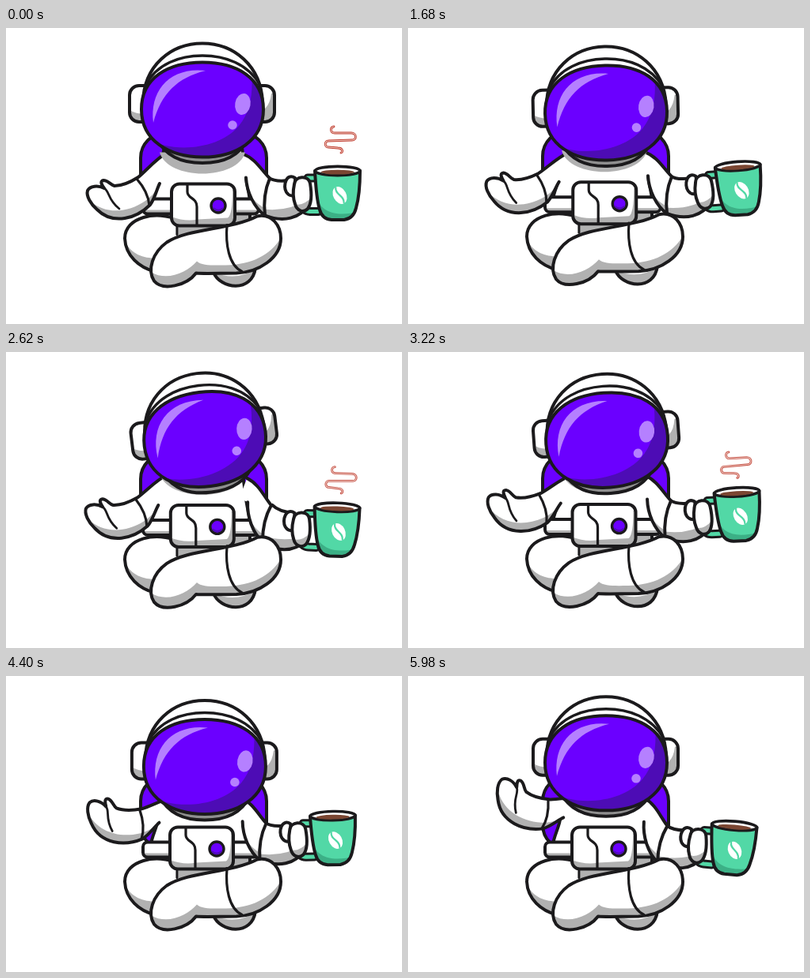
Recreate the animation shown at these times as an HTML page. Size 500 by 375 pixels, loop 6 s.

```html
<!DOCTYPE html>
<html lang="en">
<head>
<meta charset="utf-8">
<title>Meditating astronaut</title>
<style>
html, body { margin: 0; width: 100%; height: 100%; overflow: hidden; background: #fff; }
svg { display: block; width: 100vw; height: 100vh; }
</style>
</head>
<body>
<svg id="stage" viewBox="0 0 500 375" fill="none" stroke-linecap="round" stroke-linejoin="round"></svg>
<script>
const INK = '#1b1a1c', GRAY = '#b1b1b1', WHITE = '#fff', PURPLE = '#6b00ff';
const MINT = '#52d8a6', MINT_DARK = '#3cb086';
let clips = 0;

const fill = (d, color) => `<path d="${d}" fill="${color}"/>`;
const line = (d, width = 3.2, color = INK) => `<path d="${d}" stroke="${color}" stroke-width="${width}"/>`;
const group = (id, ...parts) => `<g id="${id}">${parts.join('')}</g>`;

// Filled shape with a clipped shadow and an outline on top
function part(d, color, shade, shadeColor = GRAY, outline = d) {
  const id = 'clip' + clips++;
  return `<clipPath id="${id}"><path d="${d}"/></clipPath>` + fill(d, color) +
    (shade ? `<g clip-path="url(#${id})">${fill(shade, shadeColor)}</g>` : '') + line(outline, 4);
}
const box = (x, y, w, h, r) =>
  `M${x + r} ${y}h${w - 2 * r}a${r} ${r} 0 0 1 ${r} ${r}v${h - 2 * r}a${r} ${r} 0 0 1 ${-r} ${r}` +
  `h${2 * r - w}a${r} ${r} 0 0 1 ${-r} ${-r}v${2 * r - h}a${r} ${r} 0 0 1 ${r} ${-r}z`;

const trunk = 'M200 150L191 191C188 202 184 209 183 218L188 254H308V218C307 207 304 198 303 188L298 150Z';
const torso = part(box(170, 131, 159, 94, 32), PURPLE) +
  part(trunk, WHITE, 'M186 236H310V256H186Z') +
  part(box(173, 215, 146, 19, 6), WHITE, 'M172 229H320V236H172Z');

const leftArmPath = 'M203 158C188 167 179 179 167 189C156 196 146 200 137 200C132 199 129 193 123 193' +
  'C118 194 121 199 124 203C116 199 106 200 103 206C101 213 107 223 115 230C125 240 137 243 150 241' +
  'C163 239 174 232 182 224C188 216 190 205 194 197';
const leftArm = group('leftArm',
  part(leftArmPath + 'L206 186Z', WHITE,
    'M106 219C125 236 153 235 176 219Q187 211 192 201L198 210L180 250H110Z', GRAY, leftArmPath),
  line('M165 191C172 199 180 212 181 225'),
  line('M124 203C131 207 128 217 143 229', 2.8));

const forearmPath = 'M331 188C339 193 349 193 360 191L382 222C372 240 350 245 327 236';
const sleevePath = 'M299 158C315 164 322 178 333 189C327 203 325 219 327 236C313 226 304 206 303 188';
const mugPath = 'M390 181C391 200 392 217 396 230Q399 242 411 243H427Q439 241 442 228C446 214 447 198 447 181Z';
const handle = 'M391 190H381Q373 205 374 222Q375 232 384 232.500H394';
const steamPath = 'M414 125C409 125 409 133 415 133H436C443 133 443 142 437 142L407 143' +
  'C402 143 402 151 407 151L419 152C425 152 426 157 423 158';
const mug = group('mug',
  line(handle, 11), line(handle, 5, MINT),
  part(mugPath, MINT, 'M388 205C396 236 416 239 446 233V246H388Z', MINT_DARK),
  '<ellipse cx="418.7" cy="181" rx="28.5" ry="5.6" fill="#fff" stroke="#1b1a1c" stroke-width="3.6"/>',
  '<ellipse cx="418.7" cy="182.6" rx="21" ry="2.9" fill="#7b4632"/>',
  '<g transform="rotate(-28 421.5 212)"><ellipse cx="421.5" cy="212" rx="8.2" ry="11.5" fill="#fff"/>',
  line('M421.500 201C416 208 427 215 421.500 223', 2.2, MINT), '</g>',
  part('M365 190C354 183 349 200 354 208C358 214 363 213 366 210Z', WHITE),
  part('M364 198C365 187 382 186 384 197C386 209 386 222 381 229C375 235 367 231 365 223Q361 212 364 198Z',
    WHITE, 'M362 222Q375 228 388 212V237H362Z'),
  group('steam', line(steamPath, 2.8, '#c0392b'), line(steamPath, 1, '#edcfc8')));
const rightArm = group('rightArm',
  group('forearm',
    part(forearmPath + 'L318 210Z', WHITE, 'M318 227Q354 234 384 214V248H318Z', GRAY, forearmPath), mug),
  part(sleevePath + 'L292 184Z', WHITE, 'M303 202Q314 222 330 228V246H310Z', GRAY, sleevePath));

const backLegs =
  part('M262 308C270 329 311 335 315 302Z', WHITE, 'M258 306Q290 322 318 302V335H258Z') +
  part('M218 242C190 229 150 238 150 265C151 287 168 302 188 307L232 270Z', WHITE,
    'M148 264C156 286 175 291 194 290V312H148Z') +
  fill('M218 246H278V256L218 264Z', GRAY) + line('M216 244V260');
const panel = group('panel',
  part(box(209, 196, 80, 53, 10), WHITE, 'M208 237Q225 244 242 241L280 239Q286 235 286 204H292V252H208Z'),
  line('M229 197V206C229 215 241 213 241 225V248'),
  '<circle cx="268" cy="223.5" r="9" fill="#6b00ff" stroke="#1b1a1c" stroke-width="3.4"/>',
  line('M262.500 227Q268 231.500 273.500 227', 2, '#4f0bb8'));
const frontLeg =
  part('M317 237C336 233 347 249 347 265C347 290 319 308 291 309C270 309 251 310 240 309' +
    'C228 325 198 332 187 319C178 305 185 283 203 270C230 252 285 254 317 237Z', WHITE,
    'M182 307C202 320 228 309 241 294C247 300 262 299 278 299C312 298 336 285 349 261V335H182Z') +
  line('M279 248C277 272 281 299 298 307');

const visor = 'M171 103C171 63 205 43.500 248 43.500C291 43.500 325 63 325 103' +
  'C325 143 290 163.500 248 163.500C206 163.500 171 143 171 103Z';
const head = group('head',
  part(box(156, 73, 34, 46, 12), WHITE, 'M154 102Q164 112 192 108V122H154Z'),
  part(box(306, 73, 33, 46, 12), WHITE, 'M304 108Q332 111 335 83H342V122H304Z'),
  part('M190 140C202 162 220 171 248 171S294 162 306 140Z', '#8f8f8f'),
  part('M173 94C174 48 208 19.500 248 19.500C288 19.500 322 48 324 94Z', WHITE),
  line('M176 73C190 45 220 35 248 35S306 45 321 73', 3.4),
  part(visor, PURPLE, 'M176 140C214 160 270 153 294 124C309 106 312 82 310 56L332 60V170H176Z', '#4d0cb5'),
  fill('M186 120C181 79 207 49 252 54C216 63 196 83 186 120Z', '#b580ff'),
  '<ellipse cx="299" cy="96.5" rx="9.7" ry="13.7" transform="rotate(10 299 96)" fill="#b580ff"/>',
  '<circle cx="286" cy="123" r="5.8" fill="#b580ff"/>');

const stage = document.getElementById('stage');
stage.innerHTML = group('body', torso, leftArm, rightArm,
  fill('M194 156C204 192 292 192 302 156Z', GRAY), backLegs, panel, frontLeg) + head;

// Each key is [time, ...values]
const tracks = {
  // x, y, turn
  head: [[0, 0, 0, 0], [640, 1, .5, 5], [1680, 2, 4, -1.3], [2620, 3, 7, -7], [3120, 3, 7, -5],
    [3760, 3, 14.5, 0], [4340, 3, 12, 0], [4960, 2, 6.8, 0], [6000, 2, 6.8, 0]],
  left: [[0, 0, -1.5, 0], [640, -3, -.5, 4], [1680, -4, .5, 6], [2620, -2, 0, 3],
    [3760, -3, 1, 17], [5100, -5, -3, 27], [6000, -5, -4, 38]],
  // x, y, shoulder, elbow, wrist
  right: [[0, 0, 0, 0, 0, 0], [640, 0, 0, 0, -.5, -3], [1680, 0, 0, 0, -1, -3], [2620, 3, 4, 6, 8, -12],
    [3760, -4, -1, -2, -8, 2], [4600, -4, 1, 4, 1, -4], [5100, -4, -1, 1, -2, 0], [6000, -4, 1, 8, 0, -3]],
  // x, y, opacity
  steam: [[0, 0, 0, 1], [640, 0, 6, .9], [1200, 0, 8, 0], [2100, 0, 8, 0], [2620, 0, 5, .9],
    [3760, -5, 5, .9], [4300, -5, 0, 0], [6000, 0, 0, 0]]
};

function sample(keys, t) {
  const i = keys.findIndex(k => k[0] > t), a = keys[i - 1], b = keys[i];
  const p = (t - a[0]) / (b[0] - a[0]);
  return a.slice(1).map((v, n) => v + (b[n + 1] - v) * p);
}
const set = (id, value, name = 'transform') => document.getElementById(id).setAttribute(name, value);
const move = (x, y) => `translate(${x} ${y})`;

function draw() {
  const t = performance.now() % 6000, rise = Math.min(t / 4360, 1);
  const [hx, hy, ha] = sample(tracks.head, t);
  const [lx, ly, la] = sample(tracks.left, t);
  const [rx, ry, shoulder, elbow, wrist] = sample(tracks.right, t);
  const [sx, sy, alpha] = sample(tracks.steam, t);
  set('body', move(0, 1.5 - 6 * rise));
  set('panel', move(-2 * rise, 0));
  set('head', move(hx, hy) + `rotate(${ha} 248 102)`);
  set('leftArm', move(lx, ly) + `rotate(${la} 211 203)`);
  set('rightArm', move(rx, ry) + `rotate(${shoulder} 300 180)`);
  set('forearm', `rotate(${elbow} 330 212)`);
  set('mug', move(0, -1.5) + `rotate(${wrist} 375 212)`);
  set('steam', move(sx, sy));
  set('steam', alpha, 'opacity');
  requestAnimationFrame(draw);
}
draw();
</script>
</body>
</html>
```
